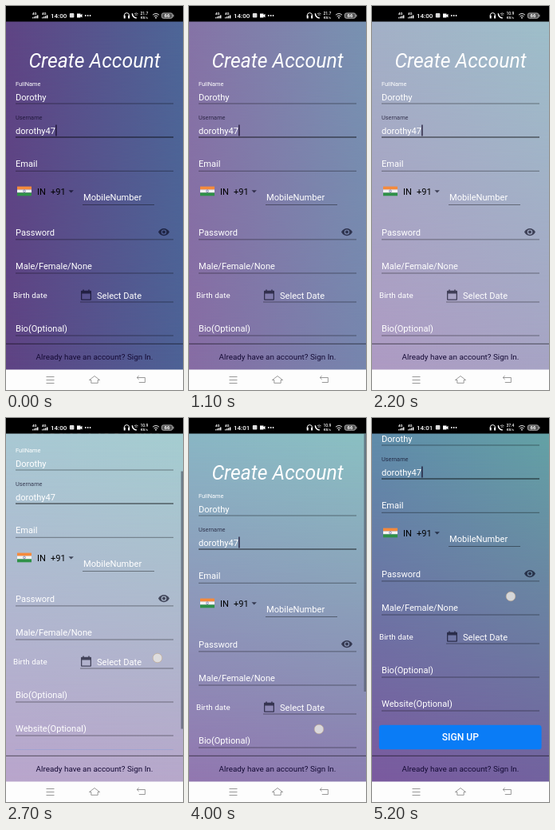
Animation of 222x480 px, one loop 5.3 s. Source, as an HTML page:

```html
<!DOCTYPE html>
<html lang="en">
<head>
<meta charset="utf-8">
<title>Create Account</title>
<style>
html, body { margin: 0; width: 100%; height: 100%; overflow: hidden; background: #000; }
svg { display: block; width: 100vw; height: 100vh; }
text { font: 11.1px Roboto, sans-serif; fill: #fff; white-space: pre; }
.small { font-size: 7.4px; }
.mid { font-size: 9.9px; }
.dark { fill: #150b35; }
.rule { stroke: #000; stroke-opacity: .5; stroke-width: .8; }
.glyph { fill: #06051a; fill-opacity: .64; fill-rule: evenodd; }
.icon { fill: none; stroke: #fff; stroke-width: 1; }
.nav { fill: none; stroke: #808080; stroke-width: .8; }
</style>
</head>
<body>
<svg viewBox="0 0 222 480">
  <defs>
    <linearGradient id="topRow"><stop/><stop offset="1"/></linearGradient>
    <linearGradient id="bottomRow"><stop/><stop offset="1"/></linearGradient>
    <linearGradient id="fade" x2="0" y2="1"><stop stop-color="#fff"/><stop offset="1" stop-color="#fff" stop-opacity="0"/></linearGradient>
    <mask id="fadeMask" style="mask-type:alpha"><rect y="19" width="222" height="436" fill="url(#fade)"/></mask>
    <clipPath id="view"><rect y="19.5" width="222" height="395"/></clipPath>
  </defs>

  <rect y="19" width="222" height="436" fill="url(#bottomRow)"/>
  <rect y="19" width="222" height="436" fill="url(#topRow)" mask="url(#fadeMask)"/>

  <g clip-path="url(#view)">
    <g id="form">
      <text x="111" y="76.7" text-anchor="middle" style="font-size:24.8px;font-style:italic">Create Account</text>
      <text class="small" x="12" y="99.7">FullName</text>
      <text x="12" y="118">Dorothy</text>
      <text class="small" x="12" y="142" style="fill:#0a0520;fill-opacity:.7">Username</text>
      <text id="user" x="12" y="160">dorothy47</text>
      <rect id="caret" y="148.5" width="1.2" height="14" fill="#140a28"/>
      <text x="12" y="201">Email</text>
      <g>
        <rect x="14" y="225.6" width="18" height="3.9" fill="#f58a3c"/>
        <rect x="14" y="229.5" width="18" height="3.9" fill="#f4f4f4"/>
        <rect x="14" y="233.4" width="18" height="3.9" fill="#2f9148"/>
        <circle cx="23" cy="231.4" r="1.4" fill="none" stroke="#4a4a98" stroke-width=".6"/>
      </g>
      <text x="39" y="236" style="fill:#000">IN</text>
      <text x="56" y="236" style="fill:#000">+91</text>
      <path class="glyph" d="M78.5 230.2h6.4l-3.2 3.4z"/>
      <text x="97" y="243">MobileNumber</text>
      <text x="12" y="286.5">Password</text>
      <path class="glyph" d="M191 282.6c3-6.2 11-6.2 14 0c-3 6.2-11 6.2-14 0zM194.8 282.6a3.2 3.2 0 1 0 6.4 0a3.2 3.2 0 1 0-6.4 0z"/>
      <circle class="glyph" cx="198" cy="282.6" r="2"/>
      <text x="12" y="329">Male/Female/None</text>
      <text class="mid" x="9" y="365.4">Birth date</text>
      <path class="glyph" d="M95 355.8h1.3v-1.4h1.5v1.4h5.4v-1.4h1.5v1.4h1.3q1 0 1 1v10q0 1-1 1h-11q-1 0-1-1v-10q0-1 1-1zM95.3 359.4v7.2h10.4v-7.2z"/>
      <text x="114" y="366">Select Date</text>
      <text x="12" y="407">Bio(Optional)</text>
      <text x="12" y="449">Website(Optional)</text>
      <g id="rules"></g>
      <rect x="8.8" y="471.7" width="203.8" height="30.8" rx="3.5" fill="#0a7cf6"/>
      <text x="110.8" y="491.4" text-anchor="middle" style="font-size:12.1px;font-weight:500">SIGN UP</text>
    </g>
    <rect id="bar" x="219.5" width="2.5" height="322" fill="#555c6c" fill-opacity=".7"/>
  </g>

  <path class="rule" d="M0 422.3H222" style="stroke-opacity:.7"/>
  <text class="mid dark" x="111" y="442.4" text-anchor="middle">Already have an account? Sign In.</text>
  <circle id="touch" r="5.8" fill="#e4e2e0" fill-opacity=".88" stroke="#c2ab90" stroke-opacity=".8" stroke-width=".8"/>

  <rect width="222" height="19.5" fill="#000"/>
  <g id="signals"></g>
  <text id="clock" x="56" y="14.8" style="font-size:8px;font-weight:500"></text>
  <rect x="79.8" y="9" width="5.6" height="5.6" rx="1" fill="#ddd"/>
  <path d="M89 9.5h4.5v1.7l2-1.4v4.6l-2-1.4v1.5H89z" fill="#fff"/>
  <g fill="#fff"><circle cx="99.8" cy="12" r=".9"/><circle cx="102.7" cy="12" r=".9"/><circle cx="105.6" cy="12" r=".9"/></g>
  <path class="icon" d="M148.3 13v-1.3a3.1 3.1 0 0 1 6.2 0V13"/>
  <path d="M147.7 11.8h2v3.6h-2zM153.1 11.8h2v3.6h-2z" fill="#fff"/>
  <path class="icon" d="M158.4 9.2c0 3 2.2 5.6 5.4 5.8" style="stroke-width:1.6"/>
  <path class="icon" d="M161 9.8q2.3-1.8 4.6 0M162 11.4q1.3-1 2.6 0" style="stroke-width:.7"/>
  <text id="speed" x="173.4" y="11.4" text-anchor="middle" style="font-size:5px;font-weight:500"></text>
  <text x="173.4" y="16.2" text-anchor="middle" style="font-size:4.2px;font-weight:500">KB/s</text>
  <path class="icon" d="M184 11.2q4-3.4 8 0M185.6 13q2.4-2 4.8 0" style="stroke-width:.9"/>
  <circle cx="188" cy="14.7" r=".9" fill="#fff"/>
  <rect x="195.4" y="8.9" width="13.4" height="6.4" rx="2" fill="#555" stroke="#ccc" stroke-width=".8"/>
  <rect x="209.4" y="10.7" width="1" height="2.8" fill="#ccc"/>
  <text x="202" y="14.3" text-anchor="middle" style="font-size:6px;font-weight:700">66</text>

  <rect y="454.5" width="222" height="25.5" fill="#fdfdfd"/>
  <path class="nav" d="M50.5 463.5h10M50.5 467.5h10M50.5 471.5h10"/>
  <path class="nav" d="M106.8 471.3v-3.8h-2.3l6.5-5l6.5 5h-2.3v3.8z"/>
  <path class="nav" d="M166.6 462.2l-2.4 2.3l2.4 2.3M164.4 464.5h10v6h-7.6"/>
</svg>
<script>
const LOOP = 5300, MAX = 88;
const $ = id => document.getElementById(id);

// Background corners: time, top left, top right, bottom left, bottom right
const sky = [
  [0, "5f4484", "4d6697", "5f4384", "4d6296"],
  [800, "77609b", "6782a8", "775898", "6477a5"],
  [1600, "9b93b7", "95acc1", "a18cb8", "939fbe"],
  [2700, "a8c8d3", "a4cdd0", "b9a5cc", "b7a8cb"],
  [3300, "9bb9ca", "9dcaca", "ae8cba", "a88fbb"],
  [4000, "89b6c4", "8ac0c2", "9277b0", "8b7eb1"],
  [5300, "5c89a8", "609fa3", "79589e", "70609d"]
].map(([t, ...corners]) => [t, ...corners.flatMap(c => [0, 2, 4].map(i => parseInt(c.slice(i, i + 2), 16)))]);

const scroll = [[2400, 0], [2700, 57], [2900, MAX], [3500, MAX], [3900, 0], [4300, 0], [4600, MAX]];
const barFade = [[2300, 0], [2400, 1], [4900, 1], [5150, 0]];
const drags = [
  [[2400, 190, 357], [2700, 190, 300], [2900, 190, 262]],
  [[3500, 158, 285], [4000, 163, 389], [4100, 163, 395]],
  [[4300, 172, 330], [4600, 174, 240]],
  [[5100, 174, 223], [5200, 174, 223]]
];

// Values at time t, linear between rows of [time, ...values]
function at(rows, t) {
  const i = rows.findIndex(r => r[0] > t);
  if (i === 0) return rows[0].slice(1);
  if (i < 0) return rows[rows.length - 1].slice(1);
  const a = rows[i - 1], b = rows[i], k = (t - a[0]) / (b[0] - a[0]);
  return a.slice(1).map((v, j) => v + (b[j + 1] - v) * k);
}

$("rules").innerHTML = [
  [122, 12, 210], [164, 12, 210, 1.2], [206.3, 12, 210], [248.5, 96, 186], [291.9, 12, 210],
  [334, 12, 210], [370, 93, 210], [412, 12, 210], [454, 12, 210]
].map(([y, x1, x2, w]) =>
  `<path class="rule" d="M${x1} ${y}H${x2}"${w ? ` style="stroke-width:${w};stroke-opacity:.8"` : ""}/>`).join("");

$("signals").innerHTML = [33, 45].map(x =>
  `<text x="${x}" y="11.2" style="font-size:4.4px;font-weight:700">4G</text>` +
  [0, 1, 2, 3].map(i => `<rect x="${x + i * 2}" y="${14.2 - i * .9}" width="1.4" height="${1.2 + i * .9}" fill="#fff"/>`).join("")
).join("");

const stops = document.querySelectorAll("#topRow stop, #bottomRow stop");

function draw(time) {
  let t = Math.floor(time % LOOP / 100) * 100;
  if (t >= 100 && t < 500) t = 100;

  const rgb = at(sky, t).map(Math.round);
  stops.forEach((s, i) => s.setAttribute("stop-color", `rgb(${rgb.slice(i * 3, i * 3 + 3)})`));

  const [y] = at(scroll, t);
  $("form").setAttribute("transform", `translate(0 ${-y})`);
  $("bar").setAttribute("y", 20 + y * .817);
  $("bar").setAttribute("opacity", at(barFade, t)[0]);

  $("caret").setAttribute("x", 12.3 + $("user").getComputedTextLength());
  $("caret").setAttribute("opacity", t % 1000 < 500 ? 1 : 0);

  const drag = drags.find(d => t >= d[0][0] && t <= d[d.length - 1][0]);
  $("touch").setAttribute("opacity", drag ? 1 : 0);
  if (drag) $("touch").setAttribute("transform", `translate(${at(drag, t)})`);

  $("clock").textContent = t < 3700 ? "14:00" : "14:01";
  $("speed").textContent = t < 1300 ? "21.7" : t < 4300 ? "10.9" : "37.4";
}

const start = performance.now();
function tick() {
  draw(performance.now() - start);
  requestAnimationFrame(tick);
}
tick();
</script>
</body>
</html>
```
